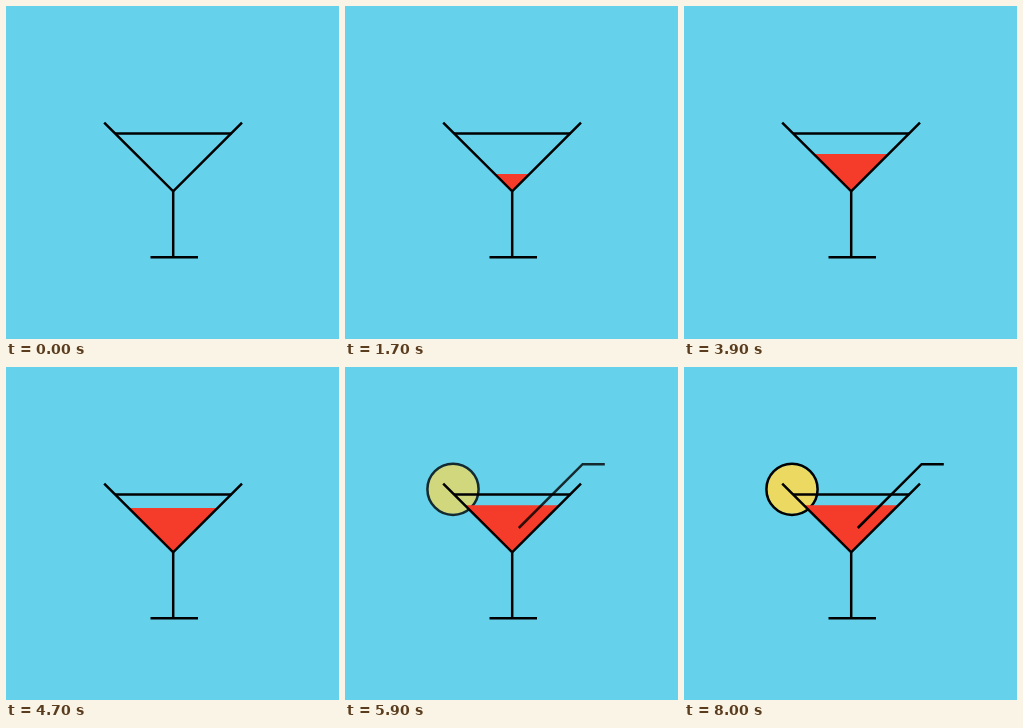
An HTML page with a canvas that plays this animation: 333x333 px, repeating every 8.1 s.

```html
<!DOCTYPE html>
<html lang="en">
<head>
<meta charset="utf-8">
<title>Cocktail</title>
<style>
html, body { margin: 0; width: 100%; height: 100%; overflow: hidden; background: #65d1eb; }
canvas { display: block; width: 333px; height: 333px; }
</style>
</head>
<body>
<canvas id="stage"></canvas>
<script>
const SIZE = 333, LOOP = 8100, STEP = 100;
const TIP = { x: 167.2, y: 185.3 };
const canvas = document.getElementById('stage');
const ctx = canvas.getContext('2d');
const ratio = window.devicePixelRatio || 1;
canvas.width = canvas.height = Math.round(SIZE * ratio);
ctx.scale(ratio, ratio);

const progress = (t, from, to) => Math.min(1, Math.max(0, (t - from) / (to - from)));

function line(...points) {
  ctx.beginPath();
  points.forEach(([x, y]) => ctx.lineTo(x, y));
  ctx.stroke();
}

function drawLemon(alpha) {
  // Fill stops at the rim's inner edge so both fade evenly.
  ctx.globalAlpha = alpha;
  ctx.fillStyle = '#ebd961';
  ctx.beginPath();
  ctx.arc(108, 122.3, 24.5, 0, Math.PI * 2);
  ctx.fill();
  ctx.beginPath();
  ctx.arc(108, 122.3, 25.6, 0, Math.PI * 2);
  ctx.stroke();
  ctx.globalAlpha = 1;
}

function drawLiquid(level) {
  const half = TIP.y - level;
  ctx.fillStyle = '#f53b29';
  ctx.beginPath();
  ctx.moveTo(TIP.x, TIP.y);
  ctx.lineTo(TIP.x - half, level);
  ctx.lineTo(TIP.x + half, level);
  ctx.fill();
}

function drawGlass() {
  line([98.2, 116.7], [TIP.x, TIP.y], [236, 116.7]);
  line([109, 127.6], [225.5, 127.6]);
  line([TIP.x, TIP.y], [TIP.x, 251.2]);
  line([144.5, 251.2], [192, 251.2]);
}

function drawStraw(alpha) {
  ctx.globalAlpha = alpha;
  line([173.8, 161], [237.6, 97.2], [259.8, 97.2]);
  ctx.globalAlpha = 1;
}

function draw(t) {
  const garnish = progress(t, 5100, 6100);
  ctx.fillStyle = '#65d1eb';
  ctx.fillRect(0, 0, SIZE, SIZE);
  ctx.strokeStyle = '#000';
  ctx.lineWidth = 2.5;
  drawLemon(garnish);
  drawLiquid(183.2 - 45 * progress(t, 0, 5000));
  drawGlass();
  drawStraw(garnish);
}

const start = performance.now();
function tick() {
  const t = (performance.now() - start) % LOOP;
  draw(Math.floor(t / STEP) * STEP);
  requestAnimationFrame(tick);
}
tick();
</script>
</body>
</html>
```
